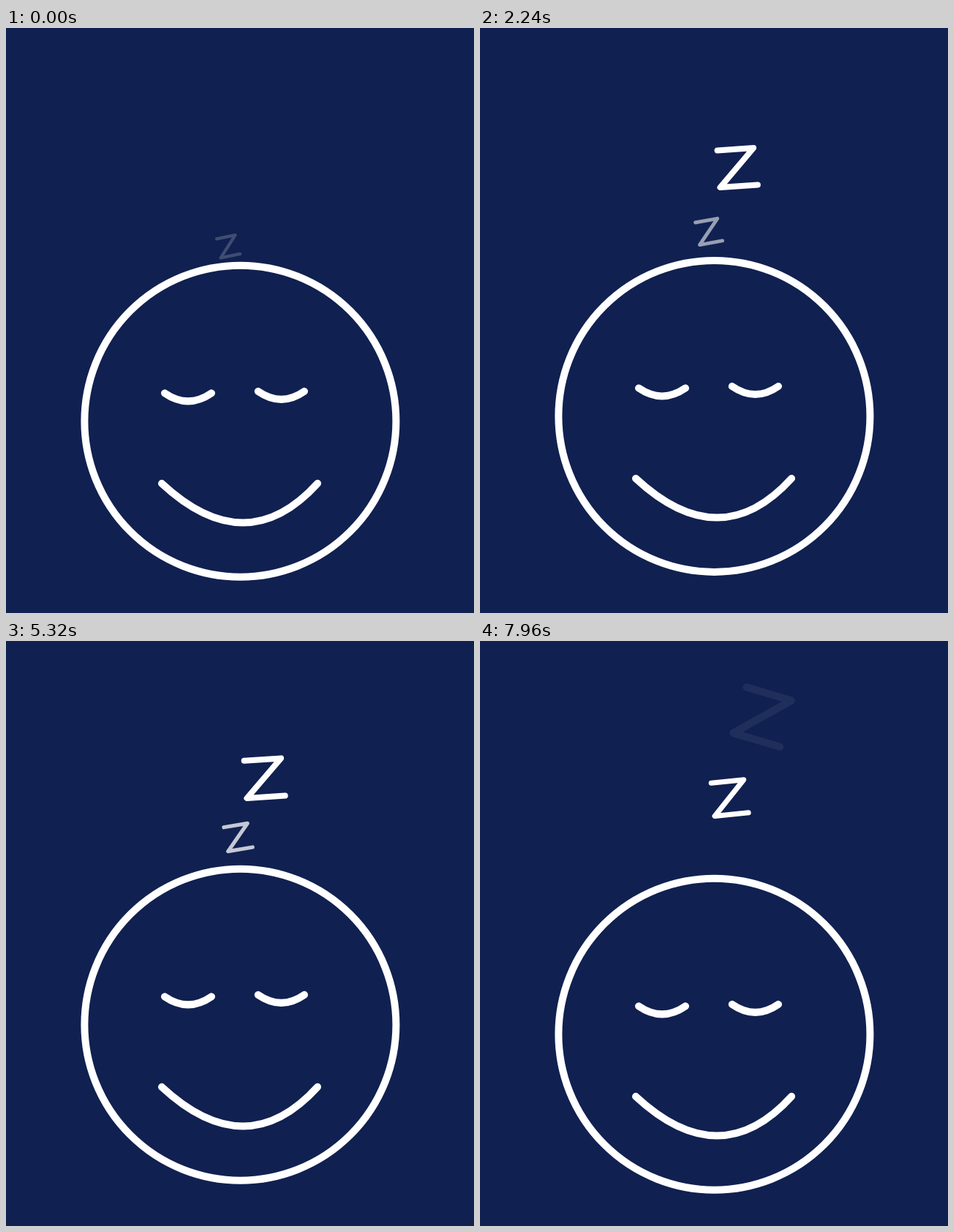
These frames come from a looping animation (640x800 px, 8 s). An HTML page with a canvas:

```html
<!DOCTYPE html>
<html lang="en">
<head>
<meta charset="utf-8">
<title>Sleeping face</title>
<style>
html, body { margin: 0; width: 100%; height: 100%; overflow: hidden; background: #102050; }
canvas { display: block; width: 640px; height: 800px; }
</style>
</head>
<body>
<canvas id="stage" width="640" height="800"></canvas>
<script>
const ctx = document.getElementById('stage').getContext('2d');
const LOOP = 8000, CYCLE = 2000, STEP = 40, SECOND_Z = 960;
const RISE = 960, FALL_END = 1960, LIFT = 16.5;

// Letter keys: age, x, y, angle in degrees, size
const KEYS = [
  [0, 303.8, 298.7, -11.7, 26.6],
  [1360, 354.7, 184.3, -3.5, 52.2],
  [2000, 388.8, 98.4, 17.9, 66]
];

// Smooth start, linear finish
function easeAway(u) {
  let lo = 0, hi = 1;
  const curve = (s, a, b) => 3 * s * (1 - s) ** 2 * a + 3 * s * s * (1 - s) * b + s ** 3;
  for (let i = 0; i < 24; i++) {
    const mid = (lo + hi) / 2;
    if (curve(mid, 1 / 3, 5 / 6) < u) lo = mid; else hi = mid;
  }
  return curve(lo, 0, 5 / 6);
}

function lift(phase) {
  if (phase < RISE) return LIFT * (1 - (1 - phase / RISE) ** 1.85);
  if (phase < FALL_END) return LIFT * (1 - easeAway((phase - RISE) / (FALL_END - RISE)));
  return 0;
}

function drawZ(age) {
  const i = age < KEYS[1][0] ? 0 : 1;
  const a = KEYS[i], b = KEYS[i + 1];
  const u = (age - a[0]) / (b[0] - a[0]);
  const [, x, y, angle, size] = a.map((v, k) => v + (b[k] - v) * u);
  const fadeIn = Math.min(1, 0.2 + 0.8 * age / 520);
  ctx.save();
  ctx.globalAlpha = i ? 1 - u : fadeIn;
  ctx.translate(x, y);
  ctx.rotate(angle * Math.PI / 180);
  ctx.scale(size / 55, size / 55);
  ctx.lineWidth = 8.6;
  ctx.beginPath();
  ctx.moveTo(-27.7, -27.5);
  ctx.lineTo(26.3, -27.5);
  ctx.lineTo(-27.3, 27.5);
  ctx.lineTo(28.7, 27.5);
  ctx.stroke();
  ctx.restore();
}

function arc(x1, x2, y, cx, cy) {
  ctx.beginPath();
  ctx.moveTo(x1, y);
  ctx.quadraticCurveTo(cx, cy, x2, y);
  ctx.stroke();
}

function drawFace(dy) {
  ctx.save();
  ctx.translate(0, -dy);
  ctx.lineWidth = 10;
  ctx.beginPath();
  ctx.arc(320.4, 537.7, 213, 0, Math.PI * 2);
  ctx.stroke();
  arc(217, 281, 499.3, 249, 521.3);
  arc(344.7, 408, 496.8, 376.5, 518.8);
  arc(213, 426, 622.8, 328.5, 730);
  ctx.restore();
}

function draw(t) {
  ctx.fillStyle = '#102050';
  ctx.fillRect(0, 0, 640, 800);
  ctx.strokeStyle = '#fff';
  ctx.lineCap = ctx.lineJoin = 'round';
  drawZ(t % CYCLE);
  if (t >= SECOND_Z) drawZ((t - SECOND_Z) % CYCLE);
  drawFace(lift(t % CYCLE));
}

const start = performance.now();
function tick() {
  const t = (performance.now() - start) % LOOP;
  draw(Math.floor(t / STEP) * STEP);
  requestAnimationFrame(tick);
}
tick();
</script>
</body>
</html>
```
